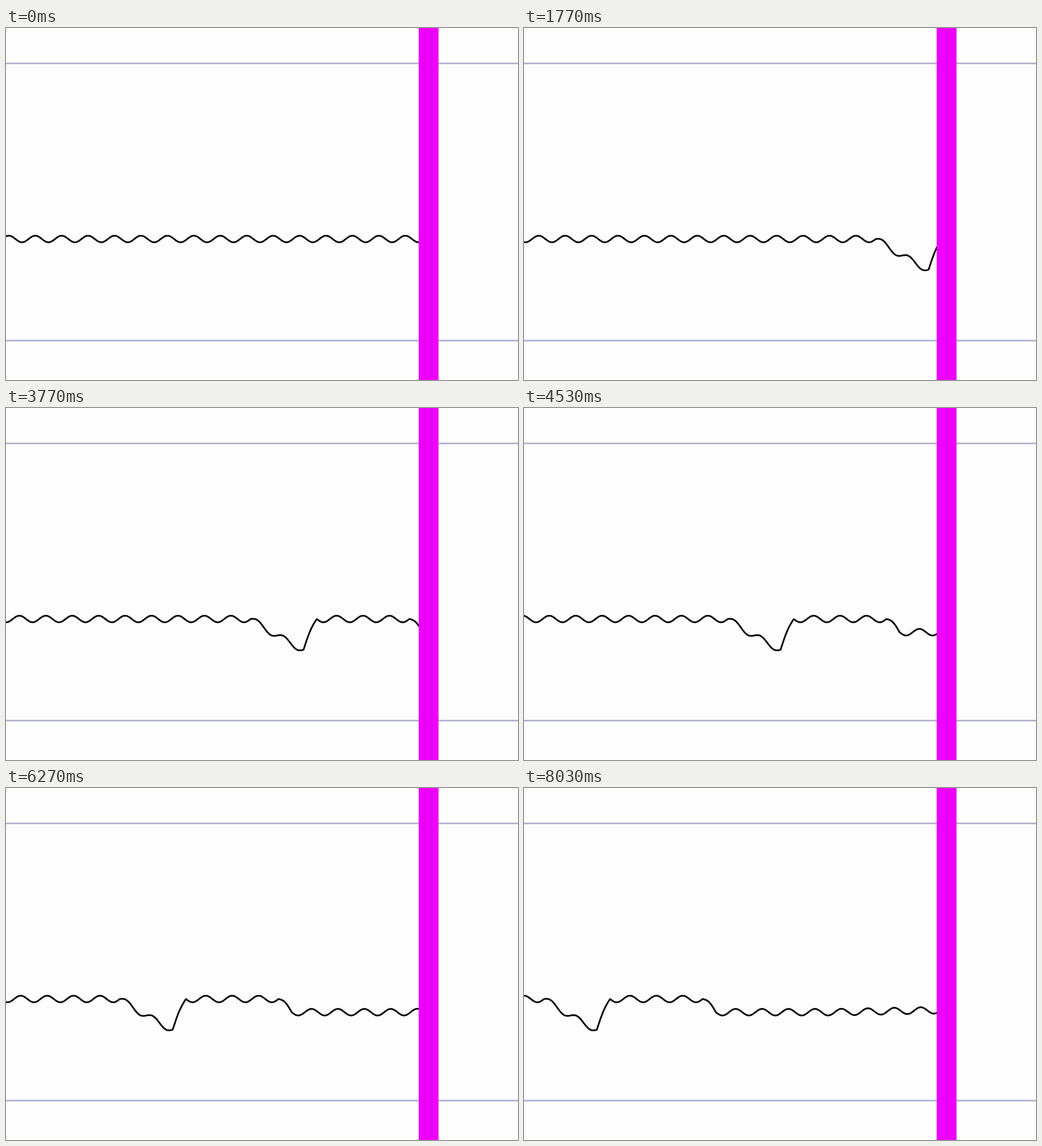
An HTML page with a canvas for the animation above (8060 ms loop, 902 px wide and 621 px high).

```html
<!DOCTYPE html>
<html lang="en">
<head>
<meta charset="utf-8">
<title>Scrolling trace</title>
<style>
  html, body { margin: 0; width: 100%; height: 100%; overflow: hidden; background: #fdfdfd; }
  canvas { display: block; }
</style>
</head>
<body>
<canvas id="stage" width="902" height="621"></canvas>
<script>
const ctx = document.getElementById('stage').getContext('2d');
const LOOP = 8060, LAST = 241;
const PERIOD = 46.57, STEP = PERIOD / 20;
const BASE = 372.2, AMP = 5.8, DIP = 785;
const BAR = { x: 727, w: 35 };

// [tick, scroll steps]
const SCROLL = [[0, 0], [53, 71], [76, 102], [113, 152], [136, 183], [188, 251], [241, 322]];

const clamp = v => Math.min(1, Math.max(0, v));

// Ticks run at 30 per second, snapped to hundredths of a second.
const tickStart = i => Math.round(i * 10 / 3) * 10;

function tickAt(ms) {
  let i = Math.min(LAST, Math.floor(ms * 0.03) + 1);
  while (i > 0 && tickStart(i) > ms) i--;
  return i;
}

function scrollAt(tick) {
  const k = Math.max(1, SCROLL.findIndex(p => p[0] >= tick));
  const [a, from] = SCROLL[k - 1], [b, to] = SCROLL[k];
  return STEP * (from + (to - from) * (tick - a) / (b - a));
}

// Slow level of the trace; n counts wave periods from the start of the dip.
function level(n, u) {
  if (n < 0) return 0;
  if (n < 2) return 31.3 * n - 2.1 * n * n;
  if (n < 2.5) return 54.2 * (2.5 - n) * 2;
  return 23.3 * clamp((n - 6) * 2) - 0.019 * Math.max(0, u - 1297);
}

function traceY(u) {
  const n = (u - DIP) / PERIOD;
  return BASE + level(n, u) - AMP * Math.sin(2 * Math.PI * n);
}

function draw(ms) {
  const shift = scrollAt(tickAt(ms));
  ctx.fillStyle = '#fdfdfd';
  ctx.fillRect(0, 0, 902, 621);
  ctx.fillStyle = '#b7b7cd';
  ctx.fillRect(0, 61, 902, 3);
  ctx.fillStyle = '#b5b5d6';
  ctx.fillRect(0, 550, 902, 3);

  ctx.beginPath();
  for (let x = -2; x <= BAR.x + 4; x++) ctx.lineTo(x, traceY(x + shift));
  ctx.strokeStyle = '#030006';
  ctx.lineWidth = 3;
  ctx.lineJoin = 'round';
  ctx.stroke();

  ctx.fillStyle = '#ec00fa';
  ctx.fillRect(BAR.x, 0, BAR.w, 621);
}

const began = performance.now();
function loop() {
  draw((performance.now() - began) % LOOP);
  requestAnimationFrame(loop);
}
loop();
</script>
</body>
</html>
```
